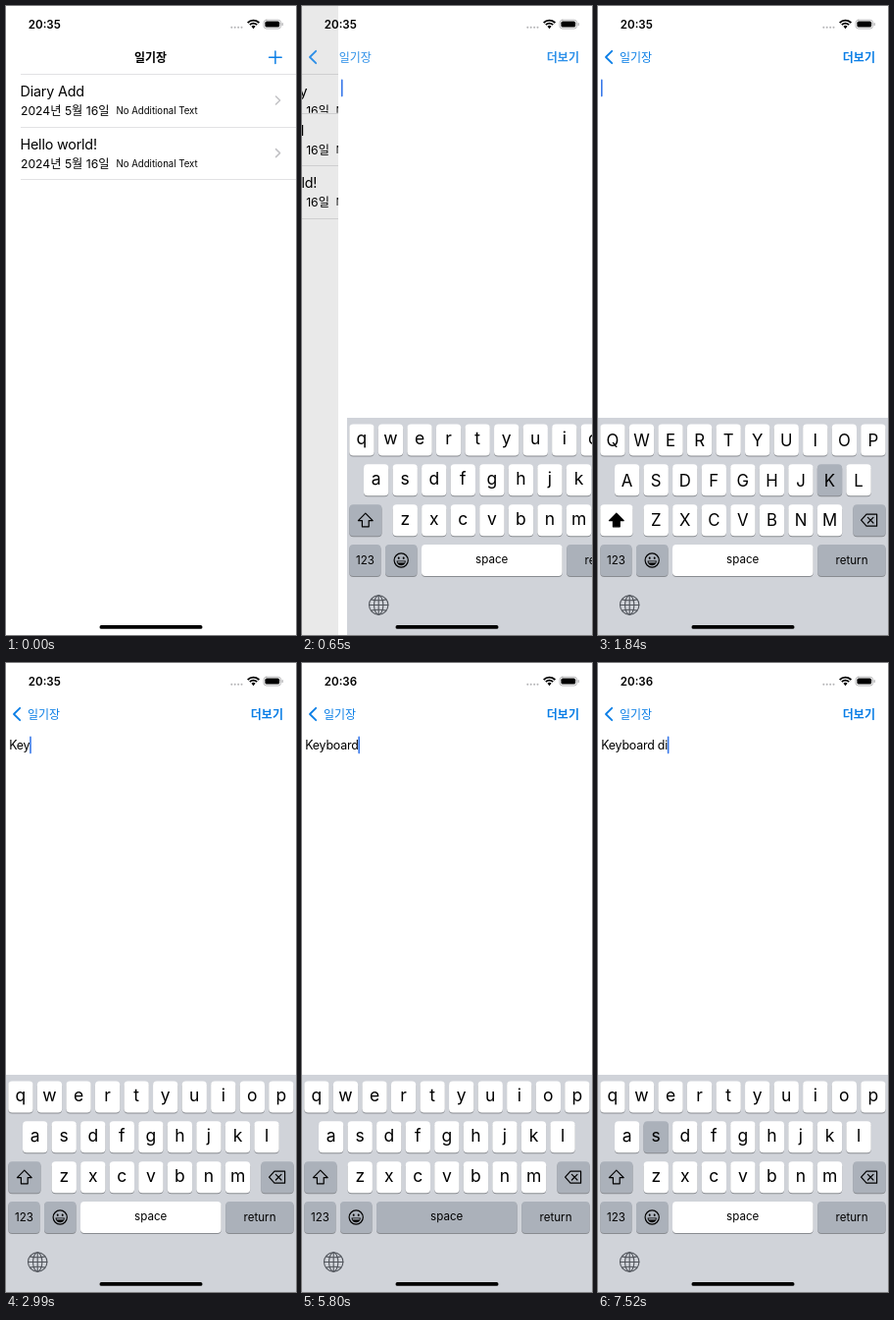
Write an HTML page with a canvas that moves like this. It is 296 px wide and 640 px high and loops after 8000 ms.

```html
<!DOCTYPE html>
<html lang="ko">
<head>
<meta charset="utf-8">
<title>Diary</title>
<style>
html, body { margin: 0; width: 100%; height: 100%; overflow: hidden; background: #fff; }
canvas { display: block; width: 296px; height: 640px; }
</style>
</head>
<body>
<canvas id="stage"></canvas>
<script>
const W = 296, H = 640, LOOP = 8000;
const FONT = 'Inter, "Noto Sans CJK KR", "Noto Sans CJK", sans-serif';
const BLUE = '#0a7ee6', CARET = '#3878ea', GREY_KEY = '#abb1ba', ROW = 53.6, TOP = 69;
const BACK = '일기장', MORE = '더보기', DATE = '2024년 5월 16일';

// key, press time, release time, time its letter appears
const STROKES = [
  ['k', 1840, 1980, 1980], ['e', 2360, 2500, 2500], ['y', 2850, 2990, 2990],
  ['b', 3340, 3450, 3450], ['o', 3850, 4010, 4010], ['a', 4450, 4600, 4600],
  ['r', 4890, 5040, 5040], ['d', 5280, 5660, 5390], ['space', 5800, 6150, 6150],
  ['d', 6150, 6280, 6280], ['i', 6700, 6850, 6850], ['s', 7520, LOOP, LOOP]
];
const SHIFT_ON = 1350, SHIFT_OFF = 1980, MINUTE = 5660;
const PUSH_STEPS = [0, 220, 330, 440, 540, 650, 760, 860, 980];

const canvas = document.getElementById('stage');
const ctx = canvas.getContext('2d');
const dpr = window.devicePixelRatio || 1;
canvas.width = W * dpr;
canvas.height = H * dpr;

const clamp = v => Math.max(0, Math.min(1, v));

// critically damped spring, 0 to 1
function spring(t, start, rate = 0.0165) {
  const u = Math.max(0, t - start) * rate;
  return 1 - (1 + u) * Math.exp(-u);
}

function text(str, x, y, size, o = {}) {
  ctx.font = `${o.weight || 400} ${size}px ${FONT}`;
  ctx.letterSpacing = (o.spacing || 0) + 'px';
  ctx.textAlign = o.align || 'left';
  ctx.fillStyle = o.color || '#000';
  ctx.fillText(str, x, y);
  return ctx.measureText(str).width;
}

function box(x, y, w, h, r, color) {
  ctx.fillStyle = color;
  ctx.beginPath();
  ctx.roundRect(x, y, w, h, r);
  ctx.fill();
}

function path(points, close) {
  ctx.beginPath();
  points.forEach(([x, y], i) => i ? ctx.lineTo(x, y) : ctx.moveTo(x, y));
  if (close) ctx.closePath();
}

function stroke(color, width) {
  ctx.strokeStyle = color;
  ctx.lineWidth = width;
  ctx.lineCap = ctx.lineJoin = 'round';
  ctx.stroke();
}

function line(points, color, width, close) {
  path(points, close);
  stroke(color, width);
}

function faded(alpha, draw) {
  if (alpha <= 0) return;
  ctx.save();
  ctx.globalAlpha *= alpha;
  draw();
  ctx.restore();
}

function shifted(x, y, draw) {
  ctx.save();
  ctx.translate(x, y);
  draw();
  ctx.restore();
}

function clipped(x, y, w, h, draw) {
  ctx.save();
  ctx.beginPath();
  ctx.rect(x, y, w, h);
  ctx.clip();
  draw();
  ctx.restore();
}

function separator(y) {
  ctx.fillStyle = '#e2e2e4';
  ctx.fillRect(15, y, W, 1);
}

function row(y, title) {
  text(title, 14.5, y + 23, 14.3, { spacing: -0.17 });
  text(DATE, 15, y + 42, 12.2);
  text('No Additional Text', 112.4, y + 41, 9.65);
  line([[275.5, y + 23], [279.6, y + 27], [275.5, y + 31]], '#c2c2c5', 1.5);
}

function list(t) {
  const k = clamp((t - 450) / 300);
  const grow = ROW * k * k * (3 - 2 * k);
  if (grow > 0) {
    clipped(0, TOP, W, grow, () => row(TOP, 'New Diary'));
    separator(TOP);
  }
  ['Diary Add', 'Hello world!'].forEach((title, i) => row(TOP + grow + i * ROW, title));
  for (let i = 0; i < 3; i++) separator(Math.round(TOP + grow + i * ROW - 0.1));
}

function statusBar(t) {
  text(t < MINUTE ? '20:35' : '20:36', 22.8, 23, 11.6, { weight: 600 });
  for (let i = 0; i < 4; i++) box(229.3 + i * 3.4, 20.8, 2, 2, 1, '#b4b4b6');
  // wifi
  for (const r of [8, 5]) {
    ctx.beginPath();
    ctx.arc(252.5, 22.6, r, -Math.PI * 0.76, -Math.PI * 0.24);
    ctx.strokeStyle = '#000';
    ctx.lineWidth = 1.8;
    ctx.lineCap = 'butt';
    ctx.stroke();
  }
  ctx.fillStyle = '#000';
  ctx.beginPath();
  ctx.moveTo(252.5, 23.2);
  ctx.arc(252.5, 22.6, 2.8, -Math.PI * 0.76, -Math.PI * 0.24);
  ctx.fill();
  // battery
  ctx.beginPath();
  ctx.roundRect(263, 14.2, 17.6, 8.8, 2.8);
  stroke('#a5a5a8', 0.8);
  box(264.4, 15.6, 14.8, 6, 1.7, '#000');
  box(281.6, 17.1, 1.1, 3, 0.6, '#a5a5a8');
}

function navBar(t) {
  const p = spring(t, 443);
  const mid = 147.5 - 109 * p;
  faded((1 - p) ** 2, () => text(BACK, mid, 56.5, 12, { weight: 600, align: 'center' }));
  faded(p, () => {
    text(BACK, mid, 56.5, 12, { color: BLUE, align: 'center' });
    line([[14.2, 45.8], [8, 52], [14.2, 58.2]], BLUE, 1.8);
    text(MORE, 249.8, 56.5, 12, { weight: 600, color: BLUE });
  });
  const press = t >= 220 && t < 440 ? 0.35 : 1;
  faded(press * clamp(1 - 2.2 * p), () => {
    line([[268.6, 52.3], [281.2, 52.3]], BLUE, 1.5);
    line([[274.9, 46], [274.9, 58.6]], BLUE, 1.5);
  });
}

function caretAlpha(t) {
  if (t >= 7290 && t < 7400) return 0.6;
  if (t >= 7400 && t < 7520) return 0.3;
  return 1;
}

function note(t) {
  let str = '';
  for (const [key, , , shown] of STROKES) {
    if (t >= shown) str += key === 'space' ? ' ' : str ? key : key.toUpperCase();
  }
  const w = text(str, 3.2, 87.5, 12.4, { spacing: -0.2 });
  faded(caretAlpha(t), () => box(3 + w, 74.6, 1.6, 17.8, 0.8, CARET));
}

function cap(x, y, w, color) {
  box(x, y + 1, w, 32, 4, '#898c91');
  box(x, y, w, 32, 4, color);
}

function shiftIcon(on) {
  path([[18.8, 516.2], [26.2, 523.6], [22.2, 523.6], [22.2, 529.8],
    [15.4, 529.8], [15.4, 523.6], [11.4, 523.6]], true);
  if (on) {
    ctx.fillStyle = '#000';
    ctx.fill();
  }
  stroke('#000', 1.2);
}

function deleteIcon() {
  line([[268.6, 523.2], [274, 517.2], [284.6, 517.2], [284.6, 529.2], [274, 529.2]], '#000', 1.2, true);
  line([[275.4, 520.4], [281, 526]], '#000', 1.2);
  line([[281, 520.4], [275.4, 526]], '#000', 1.2);
}

function emojiIcon() {
  const x = 55.2, y = 564;
  ctx.beginPath();
  ctx.arc(x, y, 7.1, 0, Math.PI * 2);
  stroke('#000', 1.2);
  for (const dx of [-2.5, 2.5]) box(x + dx - 0.9, y - 3.6, 1.8, 2.4, 0.9, '#000');
  ctx.fillStyle = '#000';
  ctx.beginPath();
  ctx.arc(x, y + 0.6, 4.7, 0, Math.PI);
  ctx.fill();
  box(x - 3.6, y + 1.3, 7.2, 1.3, 0.5, GREY_KEY);
}

function globeIcon() {
  const x = 32.2, y = 609.5, r = 9.7, color = '#50545b';
  for (const rx of [r, r * 0.48]) {
    ctx.beginPath();
    ctx.ellipse(x, y, rx, r, 0, 0, Math.PI * 2);
    stroke(color, 1.1);
  }
  line([[x, y - r], [x, y + r]], color, 1.1);
  line([[x - r, y], [x + r, y]], color, 1.1);
  for (const s of [-1, 1]) {
    ctx.beginPath();
    ctx.moveTo(x - 7.8, y + s * 5.6);
    ctx.quadraticCurveTo(x, y + s * 3.8, x + 7.8, y + s * 5.6);
    stroke(color, 1.1);
  }
}

function keyboard(t) {
  const upper = t >= SHIFT_ON && t < SHIFT_OFF;
  const down = new Set(STROKES.filter(s => t >= s[1] && t < s[2]).map(s => s[0]));
  const color = key => down.has(key) ? GREY_KEY : '#fff';

  ctx.fillStyle = '#d0d3d9';
  ctx.fillRect(0, 419, W, H - 419);
  [['qwertyuiop', 2.3], ['asdfghjkl', 17], ['zxcvbnm', 46.6]].forEach(([keys, left], r) => {
    const y = 425.4 + r * 40.9;
    [...keys].forEach((key, i) => {
      const x = left + i * 29.55;
      cap(x, y, 25.3, color(key));
      text(upper ? key.toUpperCase() : key, x + 12.65, y + (upper ? 22.2 : 20.6),
        upper ? 16.8 : 17.5, { align: 'center' });
    });
  });

  cap(2.3, 507.2, 33.2, upper ? '#fff' : GREY_KEY);
  cap(260.4, 507.2, 33.2, GREY_KEY);
  cap(2.3, 548.1, 32.2, GREY_KEY);
  cap(39, 548.1, 32.5, GREY_KEY);
  cap(76, 548.1, 143.6, color('space'));
  cap(224.2, 548.1, 69.4, GREY_KEY);
  const label = (str, x, y) => text(str, x, y, 11.6, { align: 'center' });
  label('123', 18.5, 568.4);
  label('space', 147.7, 567.2);
  label('return', 259, 568.4);
  shiftIcon(upper);
  deleteIcon();
  emojiIcon();
  globeIcon();
}

function draw(time) {
  const t = time < 980 ? PUSH_STEPS.filter(s => s <= time).pop() : time;
  const p = t < 980 ? spring(t, 432) : 1;
  const edge = Math.round(W * (1 - p));

  ctx.setTransform(dpr, 0, 0, dpr, 0, 0);
  ctx.fillStyle = '#fff';
  ctx.fillRect(0, 0, W, H);
  if (p < 1) {
    shifted(-W * 0.3 * p, 0, () => list(t));
    ctx.fillStyle = `rgba(0, 0, 0, ${0.1 * p})`;
    ctx.fillRect(0, 0, W, H);
  }
  if (p > 0) {
    shifted(edge, 0, () => {
      ctx.fillStyle = '#fff';
      ctx.fillRect(0, 0, W, H);
      note(t);
    });
    const slide = t < 980 ? Math.round(W * (1 - spring(t, 460.7, 0.0175))) : 0;
    shifted(slide, 0, () => keyboard(t));
  }
  navBar(t);
  statusBar(t);
  box(95.5, 630, 105, 3.8, 1.9, '#000');
}

const begin = performance.now();
function tick() {
  draw((performance.now() - begin) % LOOP);
  requestAnimationFrame(tick);
}
tick();
</script>
</body>
</html>
```
